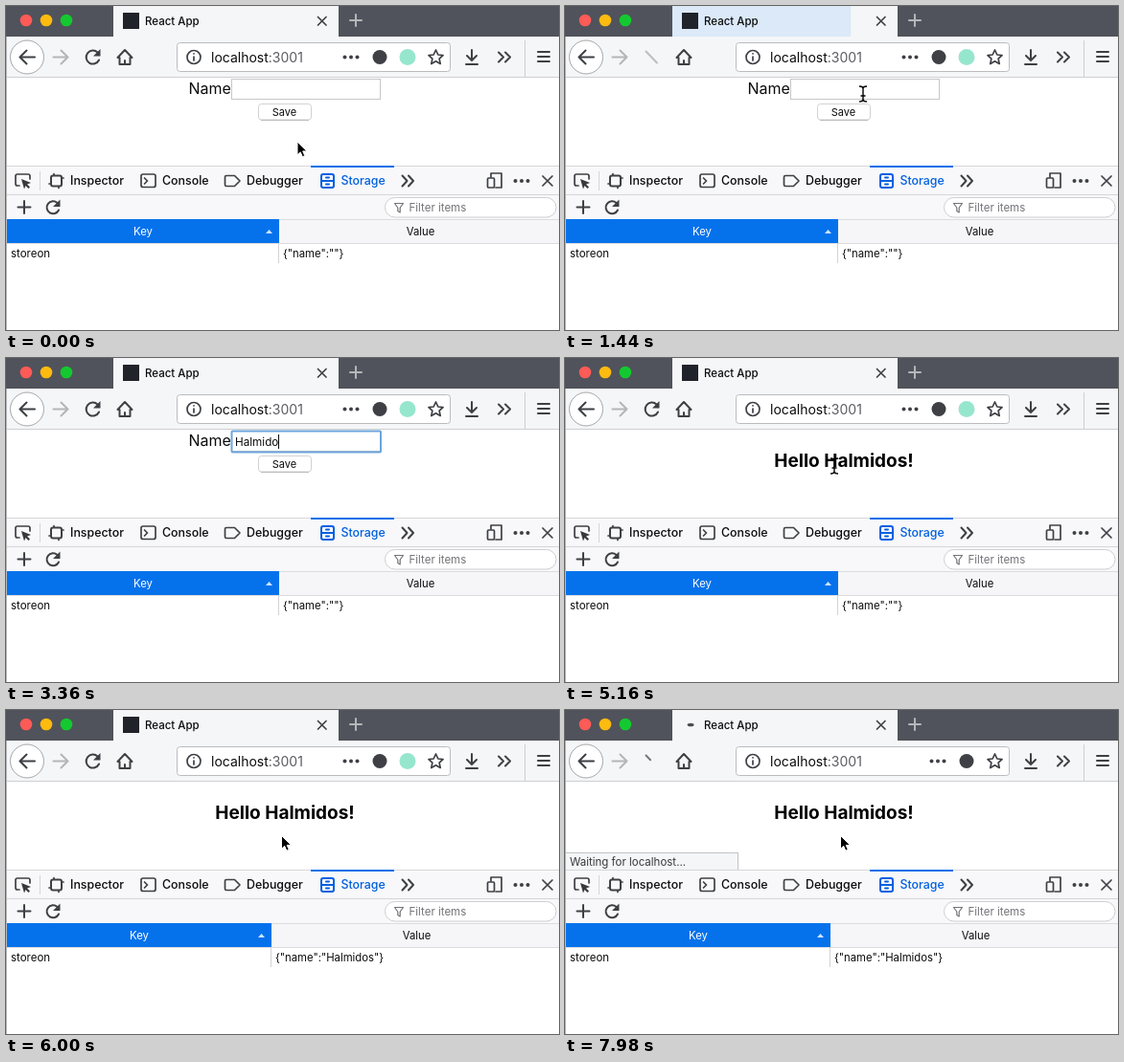
An HTML page for the animation above (8000 ms loop, 577 by 339 pixels).

```html
<!DOCTYPE html>
<html lang="en">
<head>
<meta charset="utf-8">
<title>Saved name</title>
<style>
html, body { margin: 0; width: 100%; height: 100%; overflow: hidden; background: #fff; }
svg { display: block; width: 577px; height: 339px; font: 11px Inter, "Open Sans", sans-serif; fill: #0c0c0d; }
.ic { fill: none; stroke: #3f4045; stroke-width: 2; stroke-linecap: round; stroke-linejoin: round; }
.thin { stroke-width: 1.7; }
.tab { font-size: 12.4px; font-weight: 500; }
.mid { text-anchor: middle; }
</style>
</head>
<body>
<svg viewBox="0 0 577 339">
  <rect width="577" height="339" fill="#fff"/>

  <!-- title bar -->
  <rect width="577" height="32" fill="#50535b"/>
  <circle cx="21" cy="15" r="6.300" fill="#fc5b57"/>
  <circle cx="42" cy="15" r="6.300" fill="#fdbb10"/>
  <circle cx="63" cy="15" r="6.300" fill="#14c92f"/>
  <rect x="112" width="235" height="32" fill="#f5f6f7"/>
  <rect id="burst" x="112" height="32" fill="#0a84ff"/>
  <rect id="favicon" x="122" y="7" width="17" height="17" fill="#20232a"/>
  <ellipse id="throbber" cy="15.5" rx="3.5" ry="1.8" fill="#4b4c50"/>
  <text x="145" y="20" font-size="11.500" font-weight="500">React App</text>
  <path class="ic thin" d="M325.500 11.500l8.500 8.500m0-8.500l-8.500 8.500"/>
  <path class="ic" style="stroke:#b4b6ba" d="M359 15h12m-6-6v12"/>

  <!-- navigation -->
  <rect y="32" width="577" height="43" fill="#f5f6f7"/>
  <path d="M0 74.500h577M541.500 36v38" stroke="#cfcfd2"/>
  <circle cx="22" cy="53.500" r="17.500" fill="#fff" stroke="#a5a6aa"/>
  <path class="ic" d="M30 53.500H15m6.500-7L14.500 53.500l7 7"/>
  <path class="ic" style="stroke:#b5b6b9" d="M49.500 53.500H64m-6.500-7l7 7-7 7"/>
  <path id="reload" class="ic" pathLength="1" d="M97 56.500A7 7 0 1 1 95.500 48.500"/>
  <path id="reloadTip" d="M98.500 45v7.500H91z" fill="#3f4045"/>
  <path id="stroke1" class="ic" pathLength="1" d="M84.500 47.500l11.500 12"/>
  <path id="stroke2" class="ic" pathLength="1" d="M96 47.500l-11.500 12"/>
  <path class="ic" d="M116.500 54l7.500-8 7.500 8M118.500 54v7h11v-7M124 61v-4"/>
  <rect x="178.500" y="38.500" width="285" height="30" rx="3" fill="#fff" stroke="#bbbcc0"/>
  <circle class="ic thin" cx="196" cy="53.500" r="7"/>
  <path class="ic thin" d="M196 53v4m0-7.200v.2"/>
  <text x="214" y="59" font-size="14">localhost<tspan fill="#5c5c61">:3001</tspan></text>
  <g id="pageActions" fill="#3f4045">
    <circle cx="353.500" cy="53.500" r="2"/><circle cx="360" cy="53.500" r="2"/><circle cx="366.500" cy="53.500" r="2"/>
    <circle cx="390" cy="53.500" r="7.500"/>
  </g>
  <circle id="extension" cx="419" cy="53.500" r="8.500" fill="#96e6cd"/>
  <path class="ic thin" d="M448.500 46l2.300 5 5.200.6-3.900 3.600 1.100 5.300-4.700-2.700-4.700 2.700 1.100-5.300-3.900-3.600 5.200-.6z"/>
  <path class="ic" d="M486 46v11m-5-5l5 5 5-5M480 61h12"/>
  <path class="ic" d="M514 48.500l5 5-5 5m7-10l5 5-5 5"/>
  <path class="ic" d="M555 48h12m-12 5h12m-12 5h12"/>

  <!-- page -->
  <g id="form">
    <text x="190.500" y="92" font-size="16">Name</text>
    <rect x="235.500" y="76.500" width="155" height="21" fill="#fff" stroke="#c6c6c8"/>
    <rect id="focusRing" x="235.500" y="76.500" width="155.500" height="22" rx="1" fill="none" stroke="#6ca5dc" stroke-width="2"/>
    <text id="typed" x="239" y="92" font-size="11.700"></text>
    <rect id="caret" y="80" width="1" height="15"/>
    <rect x="263.500" y="102.500" width="55" height="16.500" rx="3" fill="#fff" stroke="#d2d2d4"/>
    <path d="M266 119.500h50" stroke="#b9b9bc"/>
    <text class="mid" x="290.500" y="115">Save</text>
  </g>
  <text id="greeting" class="mid" x="291" y="114" font-size="19" font-weight="700" fill="#000"></text>
  <g id="status">
    <rect x="-.5" y="149.500" width="181" height="18" fill="#f5f6f7" stroke="#c2c3c6"/>
    <text x="5" y="163" font-size="11.500" fill="#38383d">Waiting for localhost...</text>
  </g>

  <!-- developer tools -->
  <rect y="167" width="577" height="56" fill="#f8f8fa"/>
  <path d="M0 167.500h577M0 197.500h577M35.500 173v20" stroke="#d6d6da"/>
  <rect x="318" y="167" width="87" height="2" fill="#0a70e8"/>
  <path class="ic thin" d="M14 188h-2q-2 0-2-2v-8q0-2 2-2h11q2 0 2 2v3"/>
  <path d="M16 181l10 4-4 1.500 3 3-1.500 1.500-3-3-1.500 3.500z" fill="#38383d"/>
  <rect class="ic" x="47" y="177.500" width="11" height="11" rx="2"/>
  <path class="ic thin" d="M50 177v-1.500m5 13.500v1.500M46.500 186H45m13.500-6H60"/>
  <text class="tab" x="67" y="187">Inspector</text>
  <rect class="ic thin" x="141" y="176" width="15" height="13.500" rx="2"/>
  <path class="ic thin" d="M144.500 180l3 3-3 3"/>
  <text class="tab" x="163" y="187">Console</text>
  <path class="ic thin" d="M230 177.500h8.500l5.500 5.500-5.500 5.500H230q-1.500 0-1.500-1.500v-8q0-1.500 1.500-1.500z"/>
  <text class="tab" x="251" y="187">Debugger</text>
  <g class="ic" style="stroke:#0060df">
    <rect x="329" y="176" width="13" height="14" rx="2"/>
    <path d="M329 183h13m-8-3.500h3m-3 7h3"/>
  </g>
  <text class="tab" x="349.500" y="187" fill="#0060df">Storage</text>
  <path class="ic" d="M413.500 177.500l5 5.500-5 5.500m6.500-11l5 5.500-5 5.500"/>
  <path class="ic thin" d="M506 179v-4h11v15h-6"/>
  <rect class="ic thin" x="502.500" y="180" width="7" height="10" rx="1"/>
  <g fill="#3f4045"><circle cx="531.500" cy="183" r="2"/><circle cx="538" cy="183" r="2"/><circle cx="544.500" cy="183" r="2"/></g>
  <path class="ic thin" d="M560 178l10 10m0-10l-10 10"/>
  <path class="ic" d="M12.500 210.500h13m-6.500-6.500v13"/>
  <path class="ic" d="M55 213.500A6.500 6.500 0 1 1 53.500 206"/>
  <path d="M56.500 202.500v7.500H49z" fill="#3f4045"/>
  <rect x="395.500" y="200.500" width="178.500" height="20.500" rx="10.200" fill="#fff" stroke="#cfcfd3"/>
  <path class="ic" style="stroke:#737378;stroke-width:1.200" d="M405.500 206.500h9l-3.300 4.500v5l-2.400-1.500V211z"/>
  <text x="420.500" y="215" font-size="11.500" fill="#737378">Filter items</text>

  <!-- storage table -->
  <rect y="223" width="577" height="25" fill="#f6f6f8"/>
  <path d="M0 223.500h577M0 248.500h577" stroke="#dcdce0"/>
  <path d="M.5 32v307" stroke="#b8b9bc"/>
  <rect id="divider" y="223" width="1" height="46" fill="#d3d3d7"/>
  <rect id="keyHead" x="1" y="223" height="25" fill="#0572ec"/>
  <text id="keyLabel" class="mid" y="240" font-size="11.300" fill="#fff">Key</text>
  <path id="sortMark" d="M-3.500 2L0-2l3.500 4z" fill="#cfe4ff"/>
  <text id="valueLabel" class="mid" y="240" font-size="11.300">Value</text>
  <text x="5" y="263" font-size="11.500">storeon</text>
  <text id="value" y="263" font-size="11.300"></text>

  <!-- pointer -->
  <path id="arrow" d="M0 0v13.800l3.200-3 2.100 4.900 2.500-1-2.100-4.800h4.300z" fill="#000" stroke="#fff"/>
  <path id="beam" d="M-4-8Q0-8 0-5.500Q0-8 4-8M0-6V6M-4 8Q0 8 0 5.500Q0 8 4 8M-2.500 2h5" fill="none" stroke="#000" stroke-width="1.400"/>
</svg>
<script>
const LOOP = 8000, STEP = 60, NAME = 'Halmidos';
const FOCUS = 1740, TYPE = 2160, KEY_GAP = 180, SAVE = 4680, STORED = 5340;
const loads = [[1000, 1320], [6580, 6900], [7840, 8600]];
const pointerPath = [
  [0, 304, 142], [1080, 304, 142], [1380, 311, 92], [3700, 311, 92],
  [4200, 281, 113], [5220, 281, 113], [5580, 287.5, 131.5]
];

const el = id => document.getElementById(id);
const set = (id, attrs) => { for (const k in attrs) el(id).setAttribute(k, attrs[k]); };
const show = (id, on) => { el(id).style.display = on ? '' : 'none'; };
const write = (id, text) => { if (el(id).textContent !== text) el(id).textContent = text; };
const progress = (t, from, length) => Math.min(1, Math.max(0, (t - from) / length));

function trim(id, part, color) {
  show(id, part > 0);
  el(id).style.strokeDasharray = part < 1 ? `${part} 2` : 'none';
  el(id).style.stroke = color;
}

function pointerAt(t) {
  const i = pointerPath.findIndex(p => p[0] > t);
  if (i < 0) return pointerPath[pointerPath.length - 1].slice(1);
  const [t0, x0, y0] = pointerPath[i - 1], [t1, x1, y1] = pointerPath[i];
  const u = progress(t, t0, t1 - t0), e = u * u * (3 - 2 * u);
  return [x0 + (x1 - x0) * e, y0 + (y1 - y0) * e];
}

function drawLoading(t) {
  const [start, end] = loads.filter(l => l[0] <= t).pop() || [-9000, -8000];
  const loading = t < end, since = t - start, after = t - end;
  show('favicon', !loading);
  show('throbber', loading);
  show('extension', !loading);
  show('status', loading && since >= 60);
  set('throbber', { cx: 130.5 + 5 * Math.sin((since - 120) / 1050 * 2 * Math.PI) });
  set('pageActions', { transform: `translate(${loading ? 29 : 0} 0)` });

  const reload = loading ? 1 - progress(since, 0, 100) : progress(after, 240, 160);
  trim('reload', reload, reload < 1 ? '#a9aaad' : '#3f4045');
  show('reloadTip', reload === 1);
  const ink = loading ? '#77787c' : '#bdbec1';
  trim('stroke1', loading ? progress(since, 100, 100) : 1 - progress(after, 120, 120), ink);
  trim('stroke2', loading ? progress(since, 200, 100) : 1 - progress(after, 0, 100), ink);

  const spread = 1 - (1 - progress(after, 0, 375)) ** 2;
  show('burst', !loading && after < 375);
  set('burst', { width: Math.min(235, 25 + 300 * spread), opacity: 0.24 * (1 - spread) });
}

function drawPage(t) {
  const saved = t >= SAVE, focused = t >= FOCUS && !saved;
  const count = t < TYPE ? 0 : Math.min(NAME.length, 1 + Math.floor((t - TYPE) / KEY_GAP));
  const typing = t >= TYPE && t < 3700;
  show('form', !saved);
  show('greeting', saved);
  write('greeting', `Hello ${NAME}!`);
  write('typed', NAME.slice(0, count));
  show('focusRing', focused);
  show('caret', focused && (typing || (t - FOCUS) % 1000 < 500));
  if (focused) set('caret', { x: Math.round(239 + (count ? el('typed').getComputedTextLength() : 0)) });
}

function drawTable(t) {
  const stored = t >= STORED, split = stored ? 277 : 285;
  set('keyHead', { width: split - 1 });
  set('keyLabel', { x: split / 2 + 0.5 });
  set('sortMark', { transform: `translate(${split - 10.5} 236)` });
  set('valueLabel', { x: (split + 580) / 2 });
  set('divider', { x: split - 1 });
  set('value', { x: split + 4 });
  write('value', `{"name":"${stored ? NAME : ''}"}`);
}

function drawPointer(t) {
  const [x, y] = pointerAt(t);
  const overText = t < SAVE ? y < 99 : y < 122;
  const visible = t < TYPE || t >= 3700;
  show('arrow', visible && !overText);
  show('beam', visible && overText);
  for (const id of ['arrow', 'beam']) set(id, { transform: `translate(${x} ${y})` });
}

const origin = performance.now();
function frame() {
  const t = Math.floor((performance.now() - origin) % LOOP / STEP) * STEP;
  drawLoading(t);
  drawPage(t);
  drawTable(t);
  drawPointer(t);
  requestAnimationFrame(frame);
}
frame();
</script>
</body>
</html>
```
